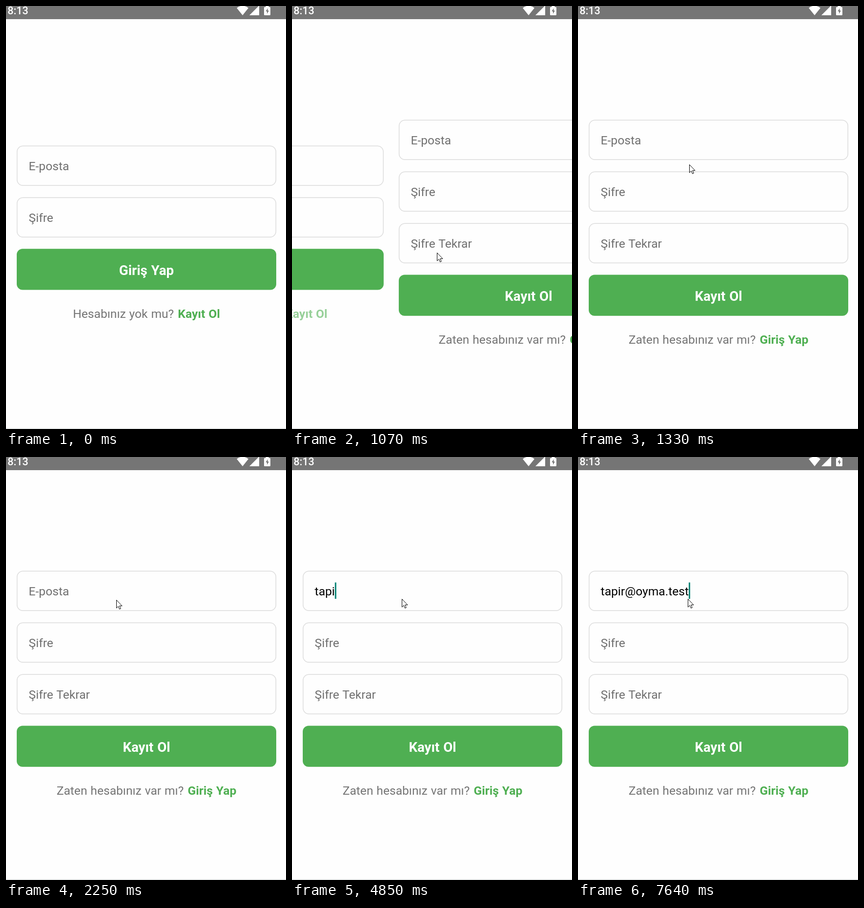
An HTML page that plays this animation: 574 by 868 pixels, repeating every 8 s.

```html
<!DOCTYPE html>
<html lang="tr">
<head>
<meta charset="utf-8">
<title>Kayıt formu</title>
<style>
  html, body { margin: 0; width: 100%; height: 100%; overflow: hidden; background: #fefefe; }
  svg { display: block; width: 574px; height: 868px; overflow: hidden; }
  text { font: 24.6px Roboto, sans-serif; fill: #707070; word-spacing: .8px; white-space: pre; }
  .clock { font-size: 21.5px; font-weight: 500; fill: #fff; }
  .field { fill: none; stroke: #dcdcdc; stroke-width: 1.5; }
  .button { fill: #4faf52; }
  .label { font-size: 27.7px; font-weight: 700; fill: #fff; text-anchor: middle; }
  .hint { fill: #757575; text-anchor: middle; }
  .link { font-weight: 700; fill: #4faf52; }
</style>
</head>
<body>
<svg viewBox="0 0 574 868">
  <rect width="574" height="868" fill="#fefefe"/>
  <g id="login"></g>
  <g id="register"></g>
  <rect y="866.5" width="574" height="1.5" fill="#dcdfdf"/>
  <rect width="574" height="27" fill="#757575"/>
  <text class="clock" x="3.3" y="17">8:13</text>
  <g fill="#fff">
    <path d="M485 19L473 4Q485-5 497 4Z"/>
    <path d="M499 19H519V-1Z"/>
    <path d="M532.5 0h6v2h2q1.5 0 1.5 1.5v14q0 1.5-1.5 1.5h-10q-1.5 0-1.5-1.5v-14q0-1.5 1.5-1.5h2z"/>
    <path d="M536.5 4.5l-4 6.5h2.5v5l4-6.5h-2.5z" fill="#757575"/>
  </g>
  <path id="cursor" d="M.5.5V17l3.7-3.5 2.4 5.7 2.6-1.1-2.4-5.5h5.2z" fill="#fff" stroke="#000"/>
</svg>
<script>
const LOOP = 8000, FRAME = 66.7, PAGE_GAP = 563, TEXT_X = 46.6;
const FOCUS_TIME = 1720, BLINK = 510;

// The address is typed in short bursts
const keystrokes = [
  { start: 3850, pace: 270, chars: 'ta' },
  { start: 4650, pace: 200, chars: 'pir' },
  { start: 5850, pace: 165, chars: '@oyma.t' },
  { start: 7310, pace: 130, chars: 'est' }
].flatMap(({ start, pace, chars }) =>
  [...chars].map((char, i) => ({ char, time: start + i * pace })));

const $ = id => document.getElementById(id);
const ramp = (t, start, duration) => Math.min(1, Math.max(0, (t - start) / duration));
const mix = (a, b, p) => a + (b - a) * p;
const curve = (a, control, b, p) => mix(mix(a, control, p), mix(control, b, p), p);
const move = (id, x, y) => $(id).setAttribute('transform', `translate(${x} ${y})`);

function formMarkup(top, fields, action, question, link) {
  const inputs = fields.map((name, i) => {
    const y = top + i * 106;
    return `<rect class="field" x="22.7" y="${y + .9}" width="530.6" height="81" rx="12"/>
      <text x="${TEXT_X}" y="${y + 50.6}">${name}</text>`;
  });
  const y = top + fields.length * 106;
  return inputs.join('') +
    `<rect class="button" x="22" y="${y}" width="532" height="84.3" rx="12"/>
    <text class="label" x="288" y="${y + 53.4}">${action}</text>
    <text class="hint" x="288" y="${y + 142}">${question} <tspan class="link" dx="1.2">${link}</tspan></text>`;
}

$('login').innerHTML = formMarkup(286.3, ['E-posta', 'Şifre'], 'Giriş Yap', 'Hesabınız yok mu?', 'Kayıt Ol');
$('register').innerHTML =
  formMarkup(233.4, ['E-posta', 'Şifre', 'Şifre Tekrar'], 'Kayıt Ol', 'Zaten hesabınız var mı?', 'Giriş Yap') +
  '<rect id="caret" y="257.5" width="3" height="33.5" fill="#008577"/>';

const loginLink = document.querySelector('#login .link');
const emailText = document.querySelector('#register text');

function drawPages(t) {
  const slide = PAGE_GAP * (1 - Math.exp(-((Math.max(0, t - 993.5) / 68) ** 2)));
  move('login', -slide, 0);
  move('register', PAGE_GAP - slide, 0);
  loginLink.style.fillOpacity = 1 - .8 * (ramp(t, 596, 200) - ramp(t, 942, 250));
}

function drawCursor(t) {
  const enter = ramp(t, 129, 333);
  const glide = Math.max(0, t - 997);
  const nudge = ramp(t, 2385, 135);
  const x = curve(517, 355, 405, enter) - 179 * (1 - Math.exp(-glide / 72)) - nudge;
  const y = curve(852, 465, 633, enter) - 340 * (1 - Math.exp(-glide / 141)) - 2 * nudge;
  move('cursor', Math.round(x), Math.round(y));
  $('cursor').style.visibility = t < 129 ? 'hidden' : 'visible';
}

function drawEmail(t) {
  const pressed = keystrokes.filter(key => key.time <= t);
  const typed = pressed.map(key => key.char).join('');
  emailText.textContent = typed || 'E-posta';
  emailText.style.fill = typed ? '#000' : '';

  // Each keystroke restarts the caret's blink
  const blinkStart = pressed.length ? pressed[pressed.length - 1].time : FOCUS_TIME;
  const lit = t >= FOCUS_TIME && Math.floor((t - blinkStart) / BLINK) % 2 === 0;
  $('caret').setAttribute('x', TEXT_X + (typed ? emailText.getComputedTextLength() : 0));
  $('caret').style.visibility = lit ? 'visible' : 'hidden';
}

function render(t) {
  // Movement advances at 15 frames per second
  const tick = Math.floor((t + 12) / FRAME) * FRAME - 4;
  drawPages(tick);
  drawCursor(tick);
  drawEmail(t);
}

const start = performance.now();
function loop() {
  render((performance.now() - start) % LOOP);
  requestAnimationFrame(loop);
}
loop();
</script>
</body>
</html>
```
